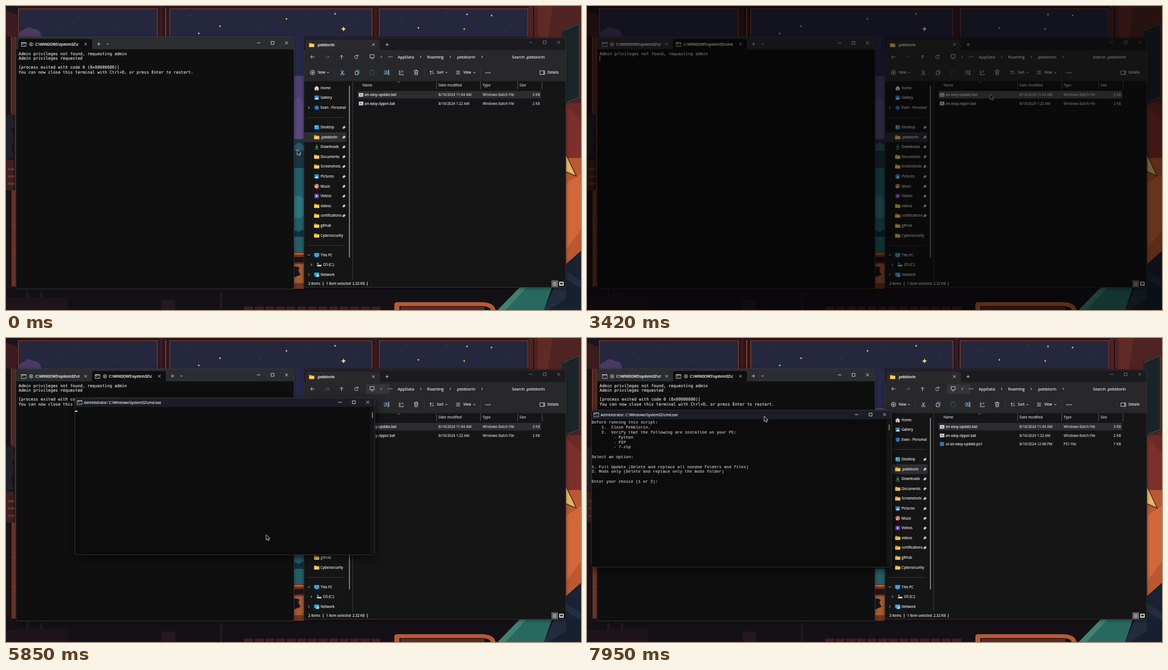
An HTML page that plays this animation: 1029x544 px, repeating every 8000 ms.

```html
<!DOCTYPE html>
<html lang="en">
<head>
<meta charset="utf-8">
<title>Desktop</title>
<style>
html, body { margin: 0; width: 100%; height: 100%; overflow: hidden; background: #000; }
svg { display: block; width: 1029px; height: 544px; }
text { font: 6.3px "Open Sans", "Noto Sans", sans-serif; fill: #f6f6f6; stroke: #f6f6f6; stroke-width: .14; white-space: pre; }
.tab text { font-size: 6.35px; font-weight: 600; }
.path text { font-size: 7.2px; }
.term text { font: 7.32px "DejaVu Sans Mono", "Noto Sans Mono", monospace; fill: #e2e2e2; stroke: #e2e2e2; }
.cmd text { font: 7.32px "Liberation Mono", "DejaVu Sans Mono", monospace; fill: #ccc; stroke: #ccc; }
.dim text { fill: #d6d6d6; stroke: #d6d6d6; }
.end { text-anchor: end; }
.line { fill: none; stroke: #d8d8d8; stroke-width: .9; }
.soft { filter: drop-shadow(0 2px 3px #0006); }
.shadow { filter: drop-shadow(2px 4px 7px #000b); }
.timed { animation: 8s step-end infinite; }
</style>
</head>
<body>
<script>
const LOOP = 8000;
let rules = '';

const pct = ms => ms * 100 / LOOP + '%';
const rect = (x, y, w, h, fill, more = '') => `<rect x="${x}" y="${y}" width="${w}" height="${h}" fill="${fill}" ${more}/>`;
const shape = (d, fill) => `<path d="${d}" fill="${fill}"/>`;
const line = (d, more = '') => `<path class="line" d="${d}" ${more}/>`;
const dot = (x, y, r, fill) => `<circle cx="${x}" cy="${y}" r="${r}" fill="${fill}"/>`;
const text = (x, y, s, more = '') => `<text x="${x}" y="${y + 2.3}" ${more}>${s}</text>`;
const group = (name, ...parts) => `<g class="${name}">${parts.join('')}</g>`;

// Visible only between two times.
function during(from, to, ...parts) {
  const name = `show-${from}-${to}`;
  rules += `@keyframes ${name}{0%{visibility:hidden}${pct(from)}{visibility:visible}${pct(to)}{visibility:hidden}}`;
  return `<g class="timed" style="animation-name:${name}">${parts.join('')}</g>`;
}

// Jumps along [ms, x, y] stops.
function moving(name, stops, ...parts) {
  const frames = stops.map(([ms, x, y]) => `${pct(ms)}{transform:translate(${x}px,${y}px)}`).join('');
  rules += `@keyframes ${name}{${frames}}`;
  return `<g class="timed" style="animation-name:${name}">${parts.join('')}</g>`;
}

const cross = (x, y, r = 2.6) => line(`M${x - r} ${y - r}l${2 * r} ${2 * r}m0 ${-2 * r}l${-2 * r} ${2 * r}`);
const plus = (x, y) => line(`M${x - 2.8} ${y}h5.6m-2.8-2.8v5.6`);
const down = (x, y) => line(`M${x - 2} ${y - 1}l2 2 2-2`, 'stroke-width=".7"');
const right = (x, y) => line(`M${x - 1} ${y - 2}l2 2-2 2`);
const buttons = (x, y, gap, opacity = 1) => `<g opacity="${opacity}">` +
  line(`M${x - 3} ${y}h6M${x + gap - 2.6} ${y - 2.6}h5.2v5.2h-5.2z`) + cross(x + 2 * gap, y) + '</g>';
const console_ = (x, y) => rect(x - 4, y - 3.5, 8.5, 7, '#111', 'stroke="#c8c8c8" stroke-width=".8"') +
  line(`M${x - 4} ${y - 2.6}h8.5M${x - 2.5} ${y - .5}h1.8m.8 2h2`);
const folder = (x, y) => shape(`M${x - 4.5} ${y - 3.5}h3.5l1.2 1.2h4.3v6h-9z`, '#d99a1c') +
  rect(x - 4.5, y - 1.3, 9, 5, '#ffd35c', 'rx=".6"');
const picture = (x, y, fill) => rect(x - 4, y - 3.8, 8, 7.6, fill, 'rx="1"');

function wallpaper() {
  const stars = [[345, 49], [383, 36], [502, 23], [589, 14], [738, 39], [820, 41], [825, 15], [869, 17]];
  const faint = [[94, 36], [330, 17], [130, 20], [190, 42], [455, 38], [538, 15], [631, 29], [706, 24], [790, 12], [905, 34]];
  let s = rect(0, 0, 1029, 544, '#120f16');
  s += shape('M0 0H1029V56H0z', '#2c151b') + shape('M0 0h24v56H0z', '#1d131a') + shape('M0 8L20 16v40H0z', '#3c1c20');
  s += [[22, 249], [293, 362], [668, 266]].map(([x, w]) =>
    rect(x, 5, w, 50, '#24273d') + line(`M${x} 54.5V5h${w}v50`, 'style="stroke:#89472b;stroke-width:1.2"')).join('');
  s += rect(275, 0, 5, 56, '#3a1b20') + rect(285, 4, 1.5, 51, '#9c4b28') + rect(659, 0, 5, 56, '#3a1b20');
  s += shape('M23 55q-2-10 9-12 8-9 17-2 13-1 14 14z', '#493963');
  s += stars.map(([x, y]) => dot(x, y, 1.5, '#eabb62')).join('') + faint.map(([x, y]) => dot(x, y, .8, '#645c70')).join('');
  s += shape('M604 36l1 3.5 3.5 1.5-3 1.5-1.5 3-1.5-3-3-1.5 3.5-1.5z', '#ffd277');
  s += rect(936, 0, 93, 56, '#4f2322') + shape('M952 0h26l-8 56h-18z', '#602b25') + rect(943, 0, 2, 56, '#211219');
  // left edge
  s += rect(0, 55, 18, 452, '#1b1218') + rect(9, 55, 8, 140, '#4f2722') + rect(10, 330, 7, 172, '#6c3425') +
    line('M9.5 55V190M16.5 55V500M10 392h7M10 445h7', 'style="stroke:#9a4a2b"') +
    shape('M0 195q17-5 13 9 8 10-4 18 10 14 0 28l5 20-14 4z', '#20202a') + rect(0, 275, 14, 55, '#3b2021');
  s += [290, 303, 316].map(y => rect(3, y, 12, 4, '#653026')).join('');
  // strip between the windows
  s += rect(515, 55, 18, 75, '#27294a') + rect(515, 125, 18, 118, '#4e4075') + shape('M515 171l8-8 10 7v71h-18z', '#5a487f') +
    rect(515, 238, 18, 55, '#1b3442') + shape('M515 250l9-6 9 6v9h-18z', '#285766') + rect(515, 290, 18, 151, '#236069') +
    shape('M515 343q10-7 18 2v30l-9 6-9-4z', '#2e7780') + shape('M515 401l9 3 9-4v13h-18z', '#102f3a') +
    rect(515, 440, 18, 67, '#6e3524') + rect(515, 442, 18, 3, '#b26534') + rect(515, 449, 18, 10, '#201318') +
    rect(515, 462, 18, 34, '#a35b30') + shape('M515 466q15 0 8 7l4 8-12 5z', '#17131a');
  // right edge
  s += rect(1002, 55, 27, 120, '#4c2222') + shape('M995 43l32-14v137l-24 8z', '#1a252a') +
    line('M997 44l29-13v133l-22 8', 'style="stroke:#564036;stroke-width:1.5"') +
    rect(1002, 174, 27, 100, '#6c2a27') + shape('M1002 178l27 28v70h-27z', '#7d3029') +
    rect(1002, 272, 27, 190, '#bb5831') + shape('M1002 318l27-18v100l-27 35z', '#d2683a') +
    shape('M1002 266l18.500 39-18.500-8z', '#e6b965') + line('M1002 265l18.500 39.500-18.500-8', 'style="stroke:#51291e;stroke-width:1.5"') +
    shape('M1002 462l27-24v106h-27z', '#182232') + shape('M1002 474l27 18v14l-27-18z', '#222d3e');
  // floor
  s += rect(0, 506, 1029, 38, '#141116') + line('M38 506v38M63 510v34M280 528v16M301 528v16M385 510v34', 'style="stroke:#2a1b20;stroke-width:3"');
  s += rect(0, 522, 110, 22, '#1d1519') + rect(279, 526, 22, 18, '#251820');
  for (let x = 426; x < 660; x += 19) s += rect(x, 538, 16, 6, '#431d23');
  s += shape('M695 544v-10q0-4 6-4h150q22 0 25 14h-8q-2-6-15-7H704v7z', '#b65a36') + rect(706, 538, 150, 6, '#5b2928');
  s += shape('M880 544l40-41h57l-14 41z', '#28695f') + shape('M880 544l40-41h12l-38 41z', '#428072') +
    shape('M963 544l18-41h48v41z', '#17202e') + shape('M981 503l21-14v35l-31 20h-8z', '#222c3e');
  return s;
}

function terminal() {
  const busy = x => `<circle class="line" cx="${x}" cy="68.5" r="3"/>` + rect(x - 1, 67.5, 2, 2, '#ddd');
  const tabShape = x => shape(`M${x} 77.5V63q0-4 4-4h124q4 0 4 4v14.5z`, '#0f0f0f');
  const title = (x, s) => group('tab', text(x, 69, s));
  const notFound = text(22.5, 85.5, 'Admin privileges not found, requesting admin');
  const exited = text(22.5, 93.8, 'Admin privileges requested') +
    text(22.5, 110, '[process exited with code 0 (0x00000000)]') +
    text(22.5, 118.3, 'You can now close this terminal with Ctrl+D, or press Enter to restart.');
  const caret = y => rect(22.5, y, .9, 8, '#ddd');
  return group('soft', rect(18, 55, 497.5, 451.5, '#0f0f0f', 'rx="4"')) +
    shape('M18 77.5V59q0-4 4-4h489.500q4 0 4 4v18.500z', '#2c2d31') +
    during(0, 2820, tabShape(22), title(52.5, 'C:\\WINDOWS\\system32\\c'), plus(166, 68), down(182, 68)) +
    during(2820, LOOP, tabShape(154), title(52.5, 'C:\\WINDOWS\\system32\\cr'), plus(298, 68), down(314, 68), cross(274.5, 68.3, 2.1)) +
    console_(31.5, 69) + busy(45) + cross(142.5, 68.3, 2.1) +
    during(3270, LOOP, console_(163.5, 69)) +
    during(3270, 5630, title(173, 'C:\\WINDOWS\\system32\\cmd.')) +
    during(5630, LOOP, busy(177), title(184, 'C:\\WINDOWS\\system32\\c')) +
    buttons(452, 66, 25) +
    group('term',
      during(0, 2820, notFound, exited), during(2820, 3010, caret(81.5)),
      during(3010, LOOP, notFound), during(3010, 5630, caret(90)), during(5630, LOOP, exited)) +
    rect(18, 55, 497.5, 451.5, 'none', 'rx="4" stroke="#414145" stroke-width=".8"');
}

function sidebar() {
  const pin = y => shape(`M${x0 + 3} ${y - 3}l3 3-1 .7-1 .3-1 2.300-3.300-3.300 2.300-1z`, '#cfcfcf') + line(`M${x0} ${y + 3}l2-2`);
  const x0 = 602;
  const drive = (x, y) => rect(x - 4, y, 8, 3, '#b7c3cc') + rect(x - 4, y - 3.5, 3, 2.5, '#35a6e0');
  const screen = (x, y) => rect(x - 4.5, y - 3.5, 9, 6.5, '#28a8e8', 'rx=".7"') + rect(x - 2, y + 3, 4, 1.2, '#8bc');
  const icons = {
    home: (x, y) => shape(`M${x - 4.5} ${y}l4.500-4 4.500 4h-1v4h-7v-4z`, '#e5ded7') + rect(x - 1, y + 1, 2, 3, '#d67338'),
    gallery: (x, y) => picture(x, y, '#2a8fd6') + shape(`M${x - 3} ${y + 3}l3-4 3 4z`, '#fff'),
    cloud: (x, y) => dot(x, y, 3.8, '#1b82d8'),
    desktop: (x, y) => picture(x, y, '#1eb2e0') + rect(x - 3, y - 2, 2, 1.5, '#d9f6ff'),
    download: (x, y) => line(`M${x} ${y - 4}v6m-2.500-2.500l2.500 2.500 2.500-2.500M${x - 3.5} ${y + 4}h7`, 'style="stroke:#17bd87;stroke-width:1.2"'),
    music: (x, y) => dot(x, y, 4.3, '#d96a5c') + line(`M${x} ${y + 1.5}v-4l2 1`) + dot(x - 1, y + 1.5, 1.2, '#fff'),
    video: (x, y) => picture(x, y, '#7a46c7') + shape(`M${x - 1.3} ${y - 2}l3.300 2-3.300 2z`, '#fff'),
    network: (x, y) => screen(x, y) + dot(x + 2, y + 2, 2.6, '#8bd0ef'),
    folder, screen, drive
  };
  const rows = [
    ['Home', 'home', 147], ['Gallery', 'gallery', 164], ['Evan - Personal', 'cloud', 182],
    ['Desktop', 'desktop', 217], ['.pebblorin', 'folder', 234.5], ['Downloads', 'download', 252],
    ['Documents', 'folder', 269.5], ['Screenshots', 'folder', 287], ['Pictures', 'gallery', 305],
    ['Music', 'music', 322.5], ['Videos', 'video', 340], ['videos', 'folder', 357.5],
    ['certifications', 'folder', 375], ['github', 'folder', 393], ['Cybersecurity', 'folder', 410.5],
    ['This PC', 'screen', 445.5], ['OS (C:)', 'drive', 463], ['Network', 'network', 480.5]
  ];
  return rect(534, 226, 75.5, 17.5, '#2e2e32', 'rx="2"') +
    rows.map(([name, icon, y]) => {
      const indent = icon === 'drive' ? 4.5 : 0;
      return icons[icon](556 + indent, y) + text(563 + indent, y, name) + (y > 210 && y < 380 ? pin(y) : '');
    }).join('') +
    right(542, 182) + down(542, 445.5) + right(546.5, 463) + right(542, 480.5) +
    line('M540 199.500h66M540 428.500h66', 'style="stroke:#3a3a3c"') +
    line('M620.500 135V490', 'style="stroke:#414143"') + rect(613.8, 143, 1.5, 307, '#9b9b9b');
}

function toolbar() {
  const blue = 'style="stroke:#55aee5"';
  const box = (x, y, w, h) => `M${x} ${y}h${w}v${h}h${-w}z`;
  return plus(548.5, 119) + '<circle class="line" cx="548.5" cy="119" r="4"/>' + text(558, 119, 'New') + down(576, 119) +
    line('M599.500 115l4 6m1-6l-4 6') + `<circle class="line" cx="600" cy="122" r="1.4" ${blue}/><circle class="line" cx="604" cy="122" r="1.4" ${blue}/>` +
    line(box(625, 117, 5, 6)) + line('M627 117v-2h5v6h-2', blue) +
    line(box(651.5, 115.5, 7, 7.5), 'style="stroke:#285c45"') + line('M653.500 115h3', 'style="stroke:#5b705f"') +
    line(box(677, 116, 8, 6), blue) + line('M679 121l2-4 2 4m2-7v10') +
    line('M706 116h-2v7h7v-2') + line('M705.500 121q0-4 5-4m-2-2l2.500 2-2.500 2', blue) +
    line('M730 116h8m-5 0v-1.500h2v1.500m-4 0l.8 7h4.400l.8-7m-4 2v3m2-3v3') +
    line('M760 123v-7m-2 2l2-2 2 2') + line('M764 115v7m-2-2l2 2 2-2', blue) + text(771, 119, 'Sort') + down(788, 119) +
    line('M805.500 116.500h7m-7 2.500h7m-7 2.500h7') + text(818.5, 119, 'View') + down(838, 119) +
    [859, 862.5, 866].map(x => dot(x, 119.5, .9, '#eee')).join('') +
    line(box(955.5, 116, 8.5, 6.5)) + rect(961.5, 116, 2.5, 6.5, '#55aee5') + text(969, 119, 'Details') +
    line('M587.500 112v15M748.500 112v15M849.500 112v15', 'style="stroke:#3d3d40"');
}

function fileRow(y, name, date, type, size, script) {
  const icon = script ? rect(631.5, y - 3.5, 7.5, 7, '#2f70c4')
    : rect(631.5, y - 3, 8, 6.5, '#d9dde1') + dot(635, y, 1.6, '#77838c') + dot(637.5, y + 1.5, 1.2, '#9aa3aa');
  return icon + text(642, y, name) + group('dim', text(774, y, date), text(853, y, type), text(955.5, y, size, 'class="end"'));
}

function explorer() {
  const rowFill = (y, fill) => rect(629, y, 328.5, 13.5, fill);
  const marked = '#2c2c31', hovered = '#4c4c4c';
  const crumbs = [[701, 'AppData'], [753.5, 'Roaming'], [805.5, '.pebblorin'], [905.5, 'Search .pebblorin']];
  return group('soft', rect(533, 57, 469, 446.5, '#151515', 'rx="4"')) +
    shape('M533 80V61q0-4 4-4h461q4 0 4 4v19z', '#1b1b1f') +
    shape('M536 80V64q0-4 4-4h125q4 0 4 4v16z', '#2a2a2d') + rect(533, 79, 469, 55.5, '#28282b') +
    folder(547, 69.5) + group('tab', text(556.5, 69.5, '.pebblorin')) + cross(657.5, 69, 2.2) + plus(682, 69) + buttons(939, 65, 25, .5) +
    during(5630, LOOP, rect(644, 82.5, 42, 17.5, '#353538', 'rx="2"')) +
    line('M552 91h-7m3-3l-3 3 3 3M600.500 95v-7m-3 3l3-3 3 3M629.500 89.500a3 3 0 1 0 .5 2.500m0-5v2.800h-2.800') +
    line('M571 91h7m-3-3l3 3-3 3', 'opacity=".35"') + line('M651.500 87h7.500v5.500h-7.500zM653.500 94.500h3.500') +
    [671.5, 742, 795, 852].map(x => right(x, 91)).join('') + [684.5, 687.5, 690.5].map(x => dot(x, 91, .8, '#eee')).join('') +
    group('path', ...crumbs.map(([x, s]) => text(x, 91.3, s))) +
    toolbar() + sidebar() +
    group('dim', text(638, 142, 'Name'), text(774, 142, 'Date modified'), text(853, 142, 'Type'), text(919, 142, 'Size')) +
    line('M770.500 135v14M849.500 135v14M915.500 135v14M959.500 135v14', 'style="stroke:#5c5c5e"') + line('M700.500 137l2-2 2 2', 'opacity=".7"') +
    during(0, 1230, rowFill(152, marked)) + during(960, 1230, rowFill(167.3, hovered)) + during(1230, 1900, rowFill(152, hovered)) +
    during(1900, 2820, rowFill(152, '#777')) + during(2820, 3540, rowFill(152, hovered)) + during(5380, LOOP, rowFill(152, marked)) +
    fileRow(158.8, 'an-easy-update.bat', '8/16/2024 11:44 AM', 'Windows Batch File', '3 KB') +
    fileRow(174.2, 'an-easy-zipper.bat', '8/16/2024 1:22 AM', 'Windows Batch File', '2 KB') +
    during(6900, LOOP, fileRow(189.6, 'zz-an-easy-update.ps1', '8/16/2024 12:48 PM', 'PS1 File', '7 KB', true), text(541, 497, '3 items')) +
    during(0, 6900, text(541, 497, '2 items')) + text(573, 497, '1 item selected') + text(620, 497, '2.32 KB') +
    line('M567.500 493.500v7M646.500 493.500v7') +
    rect(976, 491, 12, 12, '#626264') + line('M979 495h6m-6 2.300h6m-6 2.300h6') + rect(990, 493.5, 8, 7, '#eee') + rect(991.5, 495, 5, 3.5, '#222') +
    rect(533, 57, 469, 446.5, 'none', 'rx="4" stroke="#3d3d40" stroke-width=".8"');
}

function commandWindow() {
  const lines = ['Before running this script:', '    1.  Close Pebblorin.', '    2.  Verify that the following are installed on your PC:',
    '         - Python', '         - PIP', '         - 7-zip', '', 'Select an option:', '',
    '1. Full Update (Delete and replace all needed folders and files)', '2. Mods only (Delete and replace only the mods folder)',
    '', 'Enter your choice (1 or 2):'];
  return group('shadow', rect(0, 0, 537, 281, '#0c0c0c', 'rx="4"')) +
    shape('M0 16.500V4q0-4 4-4h529q4 0 4 4v12.500z', '#1d1d27') + rect(528, 16.5, 8.5, 261, '#151515') +
    console_(8.5, 8.5) + text(16.5, 8.3, 'Administrator: C:\\Windows\\System32\\cmd.exe', 'style="font-size:6.4px"') +
    buttons(474.5, 8, 25) + rect(532, 26, 1.3, 10, '#a0a0a0') +
    rect(0, 0, 537, 281, 'none', 'rx="4" stroke="#414147" stroke-width=".8"') +
    during(5850, 7020, rect(.5, 23, 4.400, 2, '#ddd')) +
    group('cmd', during(7020, LOOP, ...lines.map((s, i) => text(.2, 22 + i * 8.8, s))));
}

// The window is dragged by its title bar, so the pointer keeps its offset to it.
const drag = [[7170, 104, 114], [7290, 76, 124], [7410, 52, 130], [7560, 28, 133], [7680, 16, 133], [7830, 10, 132], [7950, 8, 129]];
const pointer = [
  [0, 521, 257], [150, 602, 266], [320, 640, 272], [450, 673, 276], [600, 694, 256], [720, 706, 232], [840, 716, 204],
  [960, 722, 180], [1080, 725.5, 168], [1230, 721.5, 158], [5380, 465.5, 352], [6270, 462, 310], [6390, 452, 230],
  [6510, 440, 160], [6660, 434, 136], [6780, 432, 126], [6900, 432, 121], [7020, 432, 118],
  ...drag.map(([ms, x, y]) => [ms, x + 309, y + 11])
];

const arrow = '<path d="M0 0v9.500l2.300-2 1.500 3.300 1.600-.7-1.500-3.200h3.100z" fill="#050505" stroke="#eee" stroke-width=".8"/>';
const scene = wallpaper() + terminal() + explorer() +
  during(5850, LOOP, moving('drag', [[0, 123, 107], ...drag], commandWindow())) +
  moving('pointer', pointer, arrow) +
  during(3420, 3540, rect(0, 0, 1029, 544, '#000', 'opacity=".5"')) +
  during(3540, 5380, rect(0, 0, 1029, 544, '#000'));

const style = document.createElement('style');
style.textContent = rules;
document.head.append(style);
document.body.innerHTML = `<svg viewBox="0 0 1029 544">${scene}</svg>`;
</script>
</body>
</html>
```
